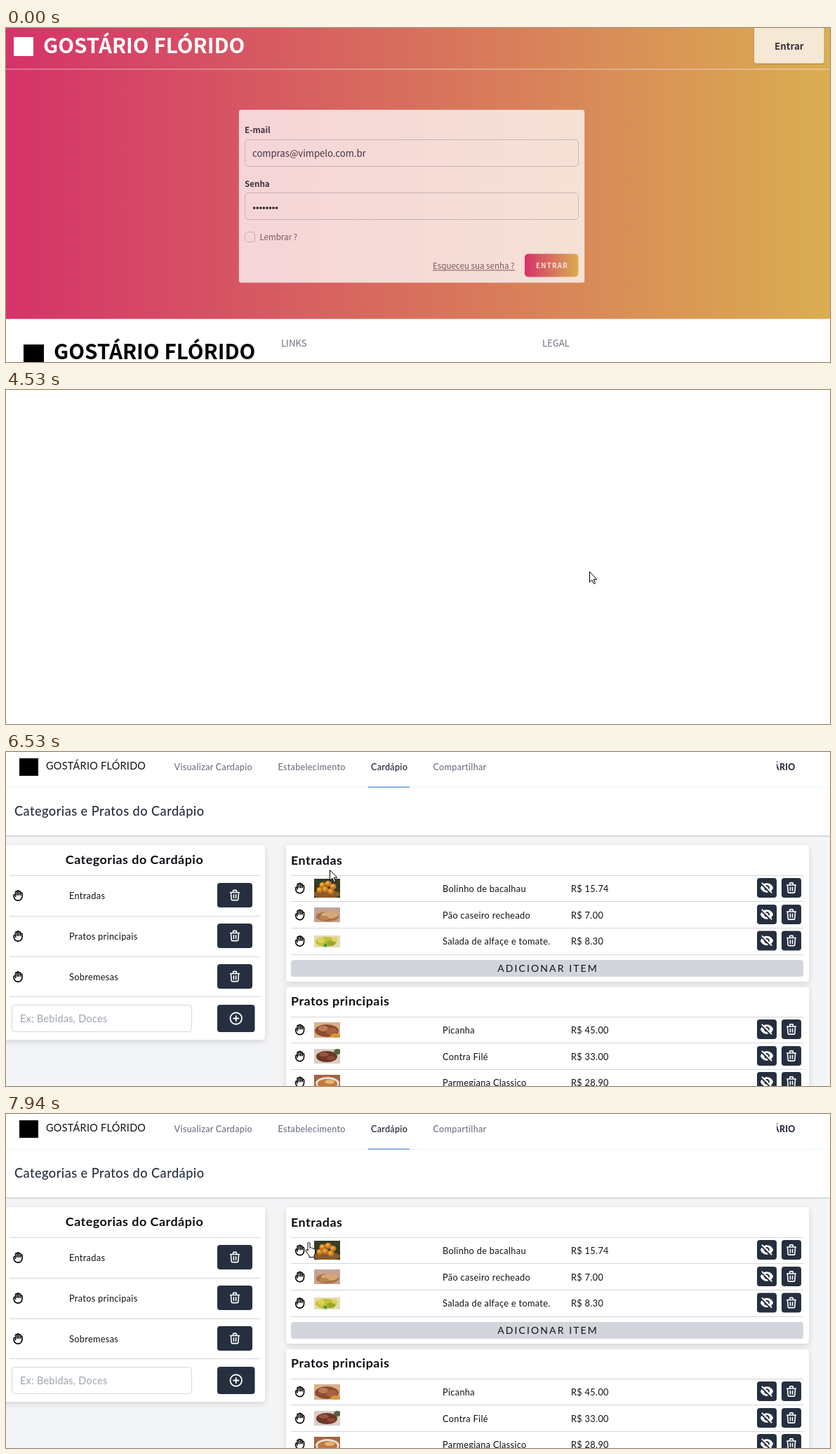
These frames come from a looping animation (1174x477 px, 8 s). An HTML page:

```html
<!DOCTYPE html>
<html lang="pt-BR">
<head>
<meta charset="utf-8">
<title>Painel do restaurante</title>
<style>
html, body { margin: 0; width: 100%; height: 100%; overflow: hidden; background: #fff; }
svg { display: block; }
text { white-space: pre; }

.login { font-family: "Noto Sans CJK JP", "Noto Sans CJK SC", "Noto Sans CJK", "Open Sans", sans-serif; }
.login, .early, .late, .loaded, .focus { animation: 8s step-end infinite; }
.login { animation-name: login; }
.early { animation-name: early; opacity: 0; font-family: "Open Sans", "Noto Sans", sans-serif; }
.late { animation-name: late; opacity: 0; font-family: Lato, "Open Sans", sans-serif; letter-spacing: .3px; }
.loaded { animation-name: loaded; opacity: 0; }
.focus { animation-name: focus; opacity: 0; }
.add-hover { animation: add 8s linear infinite; opacity: 0; }
.trash-hover { animation: trash 8s linear infinite; opacity: 0; }

@keyframes login { 0% { opacity: 1 } 56.625%, 100% { opacity: 0 } }
@keyframes early { 0% { opacity: 0 } 68.25% { opacity: 1 } 69.125%, 100% { opacity: 0 } }
@keyframes late { 0% { opacity: 0 } 69.125%, 100% { opacity: 1 } }
@keyframes loaded { 0% { opacity: 0 } 70%, 100% { opacity: 1 } }
@keyframes focus { 0% { opacity: 0 } 16.375%, 100% { opacity: 1 } }
@keyframes add { 0%, 85.375% { opacity: 0 } 87.25%, 93% { opacity: 1 } 94.9%, 100% { opacity: 0 } }
@keyframes trash { 0%, 77.2% { opacity: 0 } 78%, 79.3% { opacity: 1 } 80.5%, 100% { opacity: 0 } }

.card { fill: #fff; filter: drop-shadow(0 3px 4px rgba(0, 0, 0, .13)); }
.bar { fill: #fff; filter: drop-shadow(0 1px 1.5px rgba(0, 0, 0, .2)); }
.rule { stroke: #d2d6dc; }
.dark { fill: #252f3f; }
.line { fill: none; stroke-width: 2; stroke-linecap: round; stroke-linejoin: round; }
.field { fill: none; stroke: rgba(107, 85, 100, .3); }
</style>
</head>
<body>
<svg id="stage" width="1174" height="477" viewBox="0 0 1174 477">
  <defs>
    <linearGradient id="warm">
      <stop stop-color="#d53369"/><stop offset="1" stop-color="#daae51"/>
    </linearGradient>
    <clipPath id="cut"><rect x="1098" y="8" width="40" height="26"/></clipPath>
    <path id="hand" class="line" stroke="#000" d="M7 11.5V14m0-2.5v-6a1.5 1.5 0 113 0m-3 6a1.5 1.5 0 00-3 0v2a7.5 7.5 0 0015 0v-5a1.5 1.5 0 00-3 0m-6-3V11m0-5.5v-1a1.5 1.5 0 013 0v1m0 0V11m0-5.5a1.5 1.5 0 013 0v3m0 0V11"/>
    <path id="trash" class="line" stroke="#fff" d="M19 7l-.867 12.142A2 2 0 0116.138 21H7.862a2 2 0 01-1.995-1.858L5 7m5 4v6m4-6v6m1-10V4a1 1 0 00-1-1h-4a1 1 0 00-1 1v3M4 7h16"/>
    <path id="plus" class="line" stroke="#fff" d="M12 8v8m-4-4h8m5 0a9 9 0 11-18 0 9 9 0 0118 0z"/>
    <g id="eye" fill="#fff" fill-rule="evenodd" transform="scale(1.2)">
      <path d="M3.707 2.293a1 1 0 00-1.414 1.414l14 14a1 1 0 001.414-1.414l-1.473-1.473A10.014 10.014 0 0019.542 10C18.268 5.943 14.478 3 10 3a9.958 9.958 0 00-4.512 1.074l-1.78-1.781zm4.261 4.26l1.514 1.515a2.003 2.003 0 012.45 2.45l1.514 1.514a4 4 0 00-5.478-5.478z"/>
      <path d="M12.454 16.697L9.75 13.992a4 4 0 01-3.742-3.741L2.335 6.578A9.98 9.98 0 00.458 10c1.274 4.057 5.065 7 9.542 7 .847 0 1.669-.105 2.454-.303z"/>
    </g>
  </defs>
  <g id="scenes"></g>
  <g id="cursor" fill="#fff" stroke="#000" stroke-linejoin="round">
    <path id="arrow" d="M.5.5v15l3.4-3.3 2.5 5.6 2.3-1-2.5-5.4h4.6z"/>
    <path id="pointer" d="M-1 12V2Q-1 .5.5.5T2 2v6q1.5-1 2.5.6 1.7-.7 2.4.7 2.6-.4 2.6 1.9v4q0 1.800-1.400 3.500v2.800H1V19Q-2 16-3.800 12.600q-.6-1.600.9-1.800 1 .1 1.900 1.700z"/>
  </g>
</svg>

<script>
const BRAND = 'GOSTÁRIO FLÓRIDO';
const $ = id => document.getElementById(id);

const text = (str, x, y, size, fill, more = '') =>
  `<text x="${x}" y="${y}" font-size="${size}" fill="${fill}" ${more}>${str}</text>`;
const rect = (x, y, w, h, r, more) =>
  `<rect x="${x}" y="${y}" width="${w}" height="${h}" rx="${r}" ${more}/>`;
const rule = (x1, x2, y) =>
  `<path class="rule" d="M${x1} ${y}H${x2}"/>`;
// Icons live in a 24-unit box and are placed by its centre.
const icon = (id, x, y, size) =>
  `<use href="#${id}" transform="translate(${x - size / 2} ${y - size / 2}) scale(${size / 24})"/>`;
const iconButton = (id, x, y, w, h, size) =>
  rect(x, y, w, h, 4, 'class="dark"') + icon(id, x + w / 2, y + h / 2, size);

function login() {
  const bold = 'font-weight="700"';
  const ink = '#43313f', soft = '#7b5763';
  let dots = '';
  for (let i = 0; i < 8; i++) dots += `<circle cx="${353.6 + i * 4.57}" cy="257" r="1.8"/>`;
  return '<g class="login">'
    + rect(0, 0, 1174, 415.5, 0, 'fill="url(#warm)"')
    + rect(0, 58, 1174, 1.6, 0, 'fill="#fff" fill-opacity=".36"')
    + rect(11, 13, 28, 27, 0, 'fill="#fff"')
    + text(BRAND, 53, 36, 29.6, '#fff', bold)
    + rect(1066, -4, 99.5, 54.5, 3, 'fill="#f5e8d5" style="filter:drop-shadow(0 1px 1px rgba(0,0,0,.2))"')
    + text('Entrar', 1095, 30.5, 13.4, '#3b2f3c', bold)
    + rect(332, 117, 492, 246.5, 3, 'fill="#fff" fill-opacity=".75" stroke="#fff" stroke-opacity=".25"')
    + text('E-mail', 340, 150, 11.6, ink, bold)
    + rect(340.5, 159.500, 475, 38, 5, 'class="field"')
    + text('compras@vimpelo.com.br', 351, 184, 13.14, ink)
    + text('Senha', 340, 226.5, 11.6, ink, bold)
    + rect(340.5, 235.5, 475, 38, 5, 'class="field"')
    + `<g fill="#2b2028">${dots}</g>`
    + rect(340.5, 291.5, 14, 14, 3, 'class="field"')
    + text('Lembrar ?', 361.5, 303, 11.55, soft)
    + text('Esqueceu sua senha ?', 608, 344, 11.58, soft)
    + rect(608, 345.5, 117, 1, 0, `fill="${soft}"`)
    + '<g class="focus">' + rect(737.5, 321, 79.5, 36, 6, 'fill="none" stroke="#8c7f8c" stroke-opacity=".5" stroke-width="3"') + '</g>'
    + rect(739, 322.5, 76.5, 33, 5, 'fill="url(#warm)"')
    + '<g class="focus">' + rect(739.5, 323, 75.5, 32, 5, 'fill="none" stroke="#3f2c3c"') + '</g>'
    + text('ENTRAR', 755, 343, 9.9, '#f6e2df', bold + ' letter-spacing="1.1"')
    + rect(25, 452, 29, 28, 0, 'fill="#000"')
    + text(BRAND, 68, 473, 29.6, '#000', bold)
    + text('LINKS', 392, 454.5, 13.1, '#6b7280')
    + text('LEGAL', 764, 454.5, 13.1, '#6b7280')
    + '</g>';
}

const DISHES = [
  ['Bolinho de bacalhau', 'R$ 15.74'],
  ['Pão caseiro recheado', 'R$ 7.00'],
  ['Salada de alfaçe e tomate.', 'R$ 8.30'],
  ['Picanha', 'R$ 45.00'],
  ['Contra Filé', 'R$ 33.00'],
  ['Parmegiana Classico', 'R$ 28.90'],
];

// Everything that depends on which font has arrived.
const EARLY = {
  cls: 'early', brand: 13.9, brandY: 24.5, nav: 11.7, navX: [229, 377, 510, 599], navW: 600, tab: [506, 566],
  head: 16.9, headY: 92.5, headW: 600, headGap: 0, card: 17.1, cardY: 161.5, cardGap: 0, row: 12, field: 13.7,
  rows: [194.5, 231, 267.5, 394, 430.5, 467], rules: [176.5, 212.5, 249.5, 286.5, 375.5, 412.5, 448.5],
  cut: 325, next: 333, nextY: 361, add: 294, addW: 600, addGap: 1.9,
};
const LATE = {
  cls: 'late', brand: 14.4, brandY: 25, nav: 12.6, navX: [239.5, 387.5, 520, 608.5], navW: 500, tab: [516, 575],
  head: 18.2, headY: 91, headW: 500, headGap: .45, card: 17.9, cardY: 160, cardGap: .5, row: 12.8, field: 14.4,
  rows: [194.5, 232.5, 270, 396.5, 434.5, 471.5], rules: [176.5, 213.5, 251.5, 289.5, 378.5, 415.5, 453.5],
  cut: 328, next: 336, nextY: 362, add: 297, addW: 400, addGap: 2.1,
};

function dashboard(o, extra = '') {
  const nav = ['Visualizar Cardapio', 'Estabelecimento', 'Cardápio', 'Compartilhar'];
  const title = (str, x, y, more = '') =>
    text(str, x, y, o.card, '#0b0d12', `font-weight="700" style="letter-spacing:${o.cardGap}px" ${more}`);
  const addText = fill => text('ADICIONAR ITEM', 772, o.add + 16.7, 14, fill,
    `font-weight="${o.addW}" text-anchor="middle" style="letter-spacing:${o.addGap}px"`);

  let s = `<g class="${o.cls}">` + rect(0, 0, 1174, 477, 0, 'fill="#f4f5f7"')
    + rect(-5, -5, 1184, 124, 0, 'class="bar"')
    + rect(0, 50, 1174, 1, 0, 'fill="#f0f1f3"')
    + rect(19, 9, 27, 25, 0, 'fill="#000"')
    + text(BRAND, 57, o.brandY, o.brand, '#111')
    + nav.map((n, i) => text(n, o.navX[i], 26, o.nav, i === 2 ? '#161e2e' : '#6b7280', `font-weight="${o.navW}"`)).join('')
    + rect(o.tab[0], 49.3, o.tab[1] - o.tab[0], 1.8, 0, 'fill="#7ca7ea"')
    + text('Categorias e Pratos do Cardápio', 12, o.headY, o.head, '#252f3f',
        `font-weight="${o.headW}" style="letter-spacing:${o.headGap}px"`);

  s += rect(-8, 133, 377, 278, 4, 'class="card"')
    + title('Categorias do Cardápio', 183, o.cardY, 'text-anchor="middle"');
  ['Entradas', 'Pratos principais', 'Sobremesas'].forEach((name, i) => {
    const y = 205 + i * 58;
    s += rule(5, 362, y - 28.5) + icon('hand', 17.5, y, 19) + text(name, 90, y + 5, o.row, '#111')
      + iconButton('trash', 301, y - 18, 50, 35, 19);
  });
  s += rule(5, 362, 349.5)
    + rect(8.5, 361.5, 256, 38, 4, 'fill="#fff" stroke="#d2d6dc"')
    + text('Ex: Bebidas, Doces', 20, 386, o.field, '#9ca3af')
    + iconButton('plus', 301, 361, 53.5, 39, 22);

  s += rect(399, 133, 745, o.cut - 133, 4, 'class="card"')
    + rect(399, o.next, 745, 200, 4, 'class="card"')
    + title('Entradas', 406, o.cardY + .5)
    + title('Pratos principais', 406, o.nextY)
    + o.rules.map(y => rule(406, 1136, y)).join('');
  DISHES.forEach(([name, price], i) => {
    const y = o.rows[i];
    s += icon('hand', 419, y, 19)
      + text(name, 622, y + 5, o.row, '#111') + text(price, 805, y + 5, o.row, '#111')
      + iconButton('eye', 1070, y - 14.5, 28, 28, 19)
      + iconButton('trash', 1105, y - 14.5, 28, 28, 19);
  });
  s += rect(406, o.add, 730, 24, 4, 'fill="#d2d6dc"') + addText('#111');
  if (o === LATE) {
    s += '<g class="add-hover">' + rect(406, o.add, 730, 24, 4, 'fill="#8a929c"') + addText('#707781') + '</g>'
      + '<g class="trash-hover">' + rect(1105, 180, 28, 28, 4, 'fill="#374151"') + icon('trash', 1119, 194, 19) + '</g>';
  }
  return s + extra + '</g>';
}

// A food picture: backdrop plus a few soft blobs [x, y, rx, ry, colour].
const photo = (y, h, back, blobs) =>
  `<svg x="439" y="${y}" width="37" height="${h}">` + rect(0, 0, 37, h, 0, `fill="${back}"`)
  + blobs.map(([cx, cy, rx, ry, c]) => `<ellipse cx="${cx}" cy="${cy}" rx="${rx}" ry="${ry}" fill="${c}"/>`).join('')
  + '</svg>';

function photos() {
  const balls = [[12, 9], [20, 7], [27, 11], [8, 16], [16, 15], [24, 18]]
    .flatMap(([x, y]) => [[x, y, 4.6, 4.3, '#c9781f'], [x - 1, y - 1, 2.6, 2.2, '#e9a73f']]);
  return photo(181, 27, '#353d24', [[18, 22, 19, 6, '#8a5a2a'], ...balls])
    + photo(222, 21, '#c5a294', [[19, 13, 16, 7, '#a87344'], [22, 11, 12, 5, '#d4a877'], [14, 15, 7, 3, '#b9824f']])
    + photo(262, 17, '#e4dcae', [[17, 9, 15, 7, '#c3bf3c'], [10, 7, 5, 4, '#dcd35a'], [24, 11, 6, 4, '#98a82c'], [16, 14, 2.5, 2.5, '#4d9a45'], [29, 6, 4, 3, '#e1cf5c']])
    + photo(386, 22, '#d9b08c', [[18, 12, 17, 9, '#8f4c31'], [13, 9, 7, 4, '#bc7d59'], [25, 13, 8, 5, '#a9623f'], [31, 19, 8, 3, '#d79636']])
    + photo(424, 21, '#d6cfc6', [[18, 11, 15, 8, '#6e3628'], [14, 8, 7, 3, '#98583e'], [24, 13, 6, 3, '#8c4b36'], [33, 4, 5, 4, '#52663a']])
    + photo(461, 20, '#a5633f', [[19, 12, 17, 9, '#e9ded0'], [19, 13, 14, 7, '#c4783c'], [22, 10, 7, 3, '#e3b579']]);
}

const loaded = '<g class="loaded">' + photos()
  + '<g clip-path="url(#cut)">' + text('ÁRIO', 1124.5, 25.5, 12.3, '#252f3f', 'font-weight="800" text-anchor="end"') + '</g></g>';
$('scenes').innerHTML = login() + dashboard(EARLY) + dashboard(LATE, loaded);

// Cursor tip: time, x, y.
const PATH = [
  [70, 1054, 428], [300, 985, 365], [550, 900, 275], [700, 862, 247], [850, 829, 285],
  [1000, 790, 325], [1150, 775, 336], [1400, 777, 336], [1550, 815, 300], [1700, 832, 267],
  [1920, 831, 260], [2080, 831, 259], [5990, 831, 259], [6120, 1000, 225], [6220, 1113, 195],
  [6310, 1110, 192], [6420, 760, 178], [6525, 461, 168], [6535, 461, 168], [6650, 434, 215],
  [6760, 428, 285], [6830, 440, 305], [7000, 550, 318], [7200, 611, 309], [7260, 611, 309],
  [7380, 570, 304], [7460, 510, 275], [7560, 460, 175], [7630, 455, 143], [7720, 458, 140],
  [7820, 446, 160], [7910, 431, 183], [8000, 431, 183],
];
// Clickable areas: from, to (ms), x1, y1, x2, y2.
const LINKS = [
  [0, 4530, 739, 322, 816, 356],
  [5460, 8000, 1105, 180, 1133, 208],
  [5460, 8000, 406, 297, 1136, 321],
  [5460, 8000, 406, 177, 433, 212],
];

const sample = t => {
  const [start, step] = t < 5990 ? [70, 77.5] : [5990, 77.1];
  return t > 2080 && t < 5990 ? t : start + Math.floor((t - start) / step) * step;
};

function pointAt(t) {
  const i = Math.max(1, PATH.findIndex(p => p[0] >= t));
  const [t0, x0, y0] = PATH[i - 1], [t1, x1, y1] = PATH[i];
  const k = Math.max(0, (t - t0) / (t1 - t0));
  return [Math.round(x0 + (x1 - x0) * k), Math.round(y0 + (y1 - y0) * k)];
}

function draw() {
  const now = performance.now() % 8000;
  const [x, y] = pointAt(sample(now));
  const over = LINKS.some(([a, b, l, t, r, m]) => now >= a && now < b && x >= l && x <= r && y >= t && y <= m);
  $('cursor').setAttribute('transform', `translate(${x} ${y})`);
  $('cursor').setAttribute('visibility', now < 70 ? 'hidden' : 'visible');
  $('arrow').style.display = over ? 'none' : '';
  $('pointer').style.display = over ? '' : 'none';
  requestAnimationFrame(draw);
}
draw();
</script>
</body>
</html>
```
